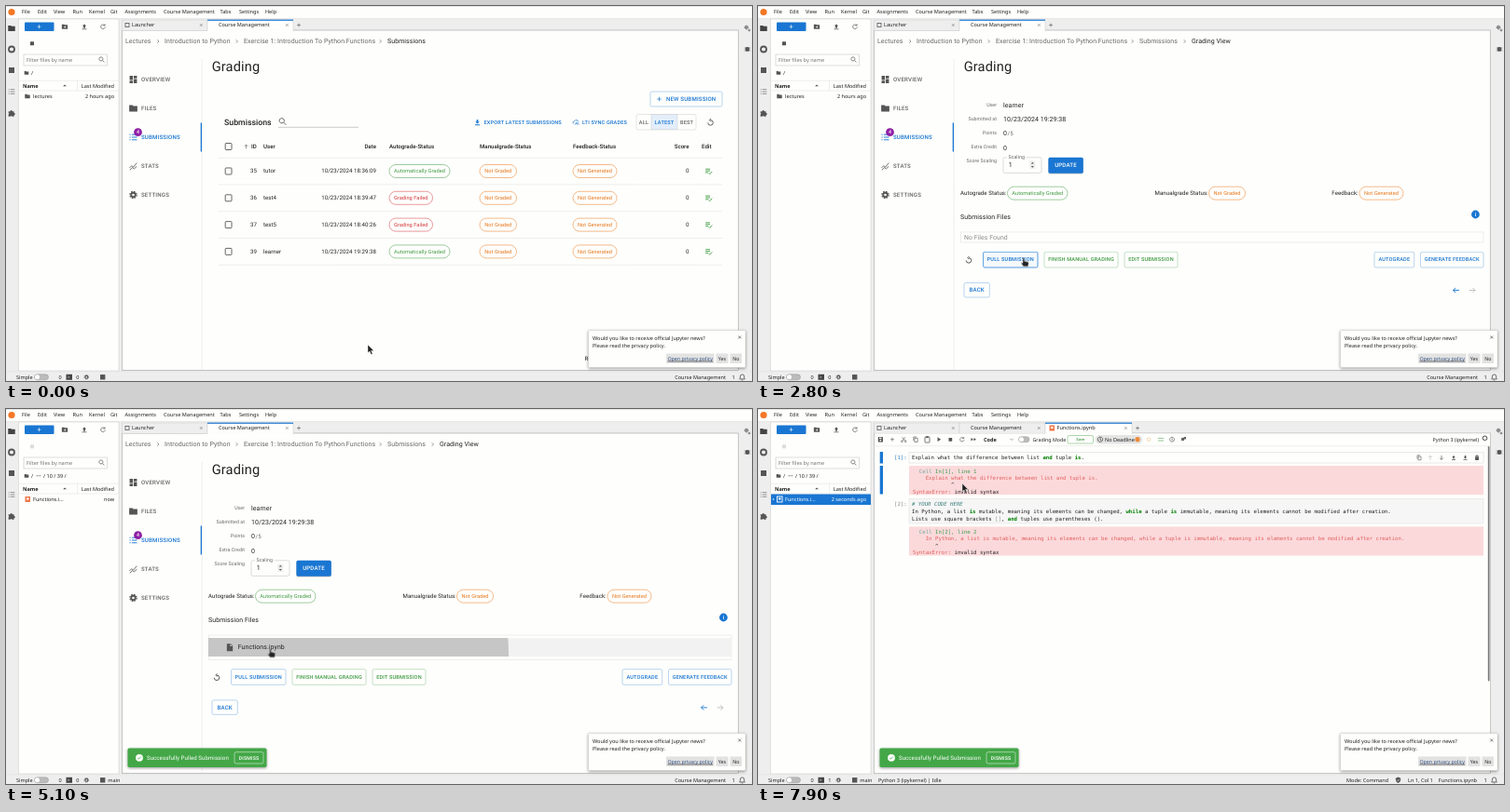
These frames come from a looping animation (800x403 px, 8 s). An HTML page:

```html
<!DOCTYPE html>
<html lang="en">
<head>
<meta charset="utf-8">
<title>Grading walkthrough</title>
<style>
html, body { margin: 0; width: 100%; height: 100%; overflow: hidden; background: #eee; }
svg { display: block; width: 100vw; height: 100vh; }
text { white-space: pre; font-family: "Noto Sans", "Open Sans", sans-serif; text-rendering: geometricPrecision; }
.r { font-family: Roboto, sans-serif; letter-spacing: .0094em; }
.b { font-family: Roboto, sans-serif; font-weight: 500; letter-spacing: .0286em; }
.h { font-family: Roboto, sans-serif; font-weight: 500; }
.m { font-family: "DejaVu Sans Mono", monospace; }
.s { font-weight: 600; }
.e { text-anchor: end; }
.c { text-anchor: middle; }
.k { font-weight: bold; fill: #008000; }
.cursor { animation: move 8s linear infinite; }
@keyframes move {
  0%, 2.5% { transform: translate(388px, 364px); animation-timing-function: ease-out; }
  11.25%, 18.75% { transform: translate(355px, 262px); animation-timing-function: ease-in-out; }
  31%, 40% { transform: translate(284px, 270.5px); animation-timing-function: ease-in-out; }
  48.75% { transform: translate(283px, 257px); }
  51.25%, 67.5% { transform: translate(282.5px, 257.5px); animation-timing-function: ease-in-out; }
  75%, 88.75% { transform: translate(273px, 213px); animation-timing-function: ease-in-out; }
  98.75%, 100% { transform: translate(219px, 80px); }
}
.ripple { animation: grow 8s linear infinite; transform-origin: 283px 262px; }
@keyframes grow {
  0%, 61.3% { transform: scale(0); opacity: .1; animation-timing-function: cubic-bezier(.4, 0, .2, 1); }
  68.2%, 100% { transform: scale(1); opacity: .26; }
}
</style>
</head>
<body>
<svg id="stage" viewBox="0 0 800 403" preserveAspectRatio="none"></svg>
<script>
const BLUE = '#1976d2', GREEN = '#3f9a43', ORANGE = '#e8761a', RED = '#d3383b',
      INK = '#212121', GREY = '#666', LINE = '#dedede', PAGE = '#fefefc', LOOP = 8000;
let css = '', count = 0;

// y is the vertical centre of the capitals; Roboto sits a little higher
const text = (x, y, s, size = 5.55, fill = INK, cls = '') =>
  `<text x="${x}" y="${y + size * (/[rbh]/.test(cls) ? .325 : .36)}" font-size="${size}" fill="${fill}" class="${cls}">${s}</text>`;
const rect = (x, y, x2, y2, fill, stroke = 'none', r = 0, w = .5) =>
  `<rect x="${x}" y="${y}" width="${x2 - x}" height="${y2 - y}" rx="${r}" fill="${fill}" stroke="${stroke}" stroke-width="${w}"/>`;
const disc = (x, y, r, fill, stroke = 'none', w = .8) =>
  `<circle cx="${x}" cy="${y}" r="${r}" fill="${fill}" stroke="${stroke}" stroke-width="${w}"/>`;
const line = (x, y, x2, y2, color = LINE, w = .5) =>
  `<path d="M${x} ${y}L${x2} ${y2}" stroke="${color}" stroke-width="${w}"/>`;
// icons live on a 24 unit grid, centred on x, y
const place = (x, y, size) => `transform="translate(${x - size / 2} ${y - size / 2}) scale(${size / 24})"`;
const solid = (x, y, size, d, color = '#555') => `<path ${place(x, y, size)} d="${d}" fill="${color}"/>`;
const wire = (x, y, size, d, color = '#555', w = 2.4) =>
  `<path ${place(x, y, size)} d="${d}" fill="none" stroke="${color}" stroke-width="${w}"/>`;

// content shown only from one time to another
function during(from, to, body) {
  const id = 'v' + count++, at = (ms, o) => `${ms / LOOP * 100}%{opacity:${o}}`;
  css += `@keyframes ${id}{${at(0, from ? 0 : 1)}${from ? at(from, 1) : ''}${to < LOOP ? at(to, 0) : ''}}` +
    `.${id}{animation:${id} ${LOOP}ms step-end infinite}`;
  return `<g class="${id}">${body}</g>`;
}

const I = {
  folder: 'M2 4h8l2 2h10v14H2z',
  board: 'M3 13h8V3H3zm0 8h8v-6H3zm10 0h8V11h-8zm0-18v6h8V3z',
  file: 'M4 2h10l6 6v14H4zm9 1v6h6z',
  down: 'M9 3h6v7h4l-7 7-7-7h4zM4 19h16v3H4z',
  up: 'M9 17h6v-7h4l-7-7-7 7h4zM4 19h16v3H4z',
  play: 'M7 4l12 8-12 8z',
  puzzle: 'M3 7h5a3 3 0 1 1 6 0h5v5a3 3 0 1 1 0 6v4h-6a3 3 0 0 0-5 0H3v-6a3 3 0 0 0 0-5z',
  bin: 'M5 8h14v14H5zM4 4h16v2H4zM9 2h6v3H9z',
  search: 'M15 15l7 7M10 3a7 7 0 1 0 .01 0',
  plus: 'M12 4v16M4 12h16',
  cross: 'M5 5l14 14M19 5L5 19',
  next: 'M9 5l7 7-7 7',
  list: 'M8 5h14M8 12h14M8 19h14M2 5h3M2 12h3M2 19h3',
  chart: 'M2 17l6-6 4 4 9-11M3 22l7-6 4 3 7-6',
  reset: 'M12 6a7 7 0 1 1-7 7M13 2L9 6l4 4',
  refresh: 'M18 7a8 8 0 1 0 2 6M19 2v6h-6',
  edit: 'M3 6h13M3 11h13M3 16h8M12 18l3 3 7-8',
  left: 'M21 12H4M11 5l-7 7 7 7',
  right: 'M3 12h17M13 5l7 7-7 7',
  upArrow: 'M12 21V4M5 11l7-7 7 7',
  downArrow: 'M12 3v17M5 13l7 7 7-7',
  check: 'M5 12l5 5 9-10',
  copy: 'M8 7h12v15H8zM4 17V2h12',
  clock: 'M12 3a9 9 0 1 0 .01 0M12 7v6l4 2',
  cut: 'M6 3l11 14M18 3L7 17M5 17a3 3 0 1 0 .01 0M19 17a3 3 0 1 0 .01 0',
  sync: 'M3 17a5 5 0 0 1 3-9 7 7 0 0 1 13 2M9 20l3-7 3 7M16 12l5 8'
};

const gear = (x, y, r, color) => disc(x, y, r * .62, 'none', color, r * .5) +
  `<circle cx="${x}" cy="${y}" r="${r}" fill="none" stroke="${color}" stroke-width="${r * .35}" stroke-dasharray="${r * .45} ${r * .335}"/>`;
const chip = (x, y, x2, label, color) =>
  rect(x, y - 7, x2, y + 7, PAGE, color, 7) + text((x + x2) / 2, y, label, 5.65, color, 'r c');
const button = (x, y, x2, y2, label, color, size = 5.6) =>
  rect(x, y, x2, y2, PAGE, color + '99', 1.75) + text((x + x2) / 2, (y + y2) / 2, label, size, color, 'b c');
const toggle = (x, y, w) => rect(x, y - 3, x + w, y + 3, '#bbb', '#999', 3) + disc(x + 3, y, 2.5, '#fff');

function frame() {
  const menu = [['File', 17], ['Edit', 34], ['View', 51], ['Run', 71.5], ['Kernel', 89], ['Git', 112],
    ['Assignments', 127.5], ['Course Management', 169], ['Tabs', 229.5], ['Settings', 250], ['Help', 278]];
  return rect(0, 0, 800, 403, '#eee') + rect(0, 0, 800, 13, PAGE) + line(0, .3, 800, .3, '#ccc', .6) + line(0, 13.4, 800, 13.4) +
    disc(6, 6.5, 3.6, '#f37726') + menu.map(([s, x]) => text(x, 6.5, s)).join('') +
    solid(6, 24, 9, I.folder, '#444') + disc(6, 46.5, 3, 'none', '#555', 1.8) + rect(3, 66, 9, 72, '#555') +
    wire(6, 92, 8, I.list, '#666', 2) + solid(6, 115, 9, I.puzzle) +
    gear(794, 23, 2, '#555') + gear(797, 26, 1.2, '#555') + disc(795, 46.5, 2.4, '#555') +
    line(791.5, 45, 798.5, 45, '#555') + line(791.5, 48, 798.5, 48, '#555') +
    rect(13.5, 14, 121, 392, PAGE, '#ccc') + rect(124.5, 26, 785.3, 391.5, PAGE, '#b5b5b5', 0, .8) +
    line(0, 392.8, 800, 392.8, '#ddd');
}

function browser() {
  const row = (s, when) => text(29, 97, s) + text(116, 97, when, 5.55, INK, 'e');
  const bookIcon = c => rect(20.5, 94, 26, 100, c) + rect(22, 95.5, 24.5, 97.5, '#fff');
  const clone = rect(26, 38.3, 30, 42.3, '#555');
  return rect(20, 17.5, 51.5, 27, BLUE, 'none', 1) + wire(35.5, 22.2, 6, I.plus, '#fff') +
    solid(63, 22.2, 7.5, I.folder) + wire(63.2, 22.6, 3.5, I.plus, '#fff', 4) + solid(84, 22.2, 7.5, I.up) +
    wire(104, 22.2, 7, I.refresh) +
    during(0, 3100, clone) + during(3100, LOOP, `<g opacity=".2">${clone}</g>`) +
    rect(19, 52, 108.5, 64, PAGE, '#bbb') + text(22, 58, 'Filter files by name', 5.55, '#757575') +
    wire(102.5, 57.5, 7, I.search) + solid(22, 71.8, 5.5, I.folder) + text(27, 71.8, '/') +
    line(14, 80.3, 121, 80.3) + line(14, 91, 121, 91) + line(76.5, 80.3, 76.5, 91) +
    text(18, 85.6, 'Name', 5.55, INK, 's') + solid(63, 85.5, 5, 'M3 16l9-9 9 9z') +
    text(116, 85.6, 'Last Modified', 5.55, INK, 'e') +
    during(0, 3100, solid(23, 97, 6.5, I.folder) + row('lectures', '2 hours ago')) +
    during(3100, LOOP, [33, 34.8, 36.6].map(x => disc(x, 71.8, .5, INK)).join('') + text(40, 71.8, '/ 10 / 39 /')) +
    during(3100, 5800, bookIcon('#f0784a') + row('Functions.i...', 'now')) +
    during(3200, 4500, rect(27.3, 92, 62.5, 102, 'none', '#333', 0, .9)) +
    during(5800, LOOP, rect(14, 91.5, 121, 103, BLUE) + disc(16.5, 97, .8, '#fff') +
      rect(20.5, 94, 26, 100, 'none', '#fff', 0, .9) + rect(22, 95.5, 24.5, 97.5, '#fff') +
      text(29, 97, 'Functions.i...', 5.55, '#fff') + text(116, 97, '2 seconds ago', 5.55, '#fff', 'e'));
}

function tabs() {
  const tab = (x, x2, on) => rect(x, 15, x2, 26.2, on ? PAGE : '#eee', '#ccc') +
    (on ? rect(x, 14.6, x2, 15.8, BLUE) + rect(x + .3, 25.4, x2 - .3, 27, PAGE) : '') +
    wire(x2 - 6.7, 20.5, 4.5, I.cross, '#444');
  const first = tab(124.5, 216) + rect(128, 18.5, 132, 22.5, 'none', '#555', 0, .8) + text(135, 20.5, 'Launcher');
  const course = on => tab(216, 308, on) + text(228, 20.5, 'Course Management');
  return first + during(0, 5400, course(true) + wire(314, 20.5, 6, I.plus)) +
    during(5400, LOOP, course(false) + tab(308, 401, true) + rect(312.5, 17.5, 318, 23.5, '#f0784a') +
      rect(314, 19, 316.5, 21, '#fff') + text(320.5, 20.5, 'Functions.ipynb') + wire(407, 20.5, 6, I.plus));
}

function courseNav() {
  const trail = [['Lectures', 128], ['Introduction to Python', 170], ['Exercise 1: Introduction To Python Functions', 255]];
  const arrow = x => wire(x, 38, 6, I.next, GREY, 2.6);
  const items = ['OVERVIEW', 'FILES', 'SUBMISSIONS', 'STATS', 'SETTINGS'];
  return trail.map(([s, x]) => text(x, 38, s, 7, GREY, 'r')).join('') + [163, 247.5, 401.5].map(arrow).join('') +
    during(0, 1300, text(409, 38, 'Submissions', 7, INK, 'r')) +
    during(1300, LOOP, text(409, 38, 'Submissions', 7, GREY, 'r') + arrow(457.5) + text(465, 38, 'Grading View', 7, INK, 'r')) +
    items.map((s, i) => text(145, 79 + i * 31, s, 6.125, i === 2 ? BLUE : GREY, 'b')).join('') +
    solid(136.5, 79, 10.5, I.board) + solid(136.5, 110, 10.5, I.folder) + wire(136.5, 141, 9.5, I.list, BLUE) +
    wire(136.5, 172, 10, I.chart, '#555', 2) + gear(136.5, 203, 3.6, '#555') +
    disc(141.5, 135.7, 4.4, '#8e1fa5') + text(141.5, 135.7, '4', 5.25, '#fff', 'h c') +
    line(210.2, 57, 210.2, 391, '#ddd') + rect(208.7, 125.5, 210, 156.5, BLUE) +
    text(220.7, 65.3, 'Grading', 14.6, INK, 'r');
}

function submissions() {
  const box = y => rect(235.2, y - 3.5, 242, y + 3.5, PAGE, '#555', .8, .9);
  const head = [['ID', 263], ['User', 276], ['Autograde-Status', 411], ['Manualgrade-Status', 508], ['Feedback-Status', 608], ['Edit', 746]];
  const rows = [[35, 'tutor', '18:36:09', 1], [36, 'test4', '18:39:47', 0], [37, 'test5', '18:40:26', 0], [39, 'learner', '19:29:38', 1]];
  const row = ([id, who, time, ok], i) => {
    const y = 177.5 + i * 28.8;
    return box(y) + text(269, y, id, 6.125, INK, 'r e') + text(276, y, who, 6.125, INK, 'r') +
      text(397, y, '10/23/2024 ' + time, 6.125, INK, 'r e') +
      (ok ? chip(411, y, 476, 'Automatically Graded', GREEN) : chip(411, y, 457.5, 'Grading Failed', RED)) +
      chip(508, y, 547.5, 'Not Graded', ORANGE) + chip(608, y, 655, 'Not Generated', ORANGE) +
      text(732.5, y, '0', 6.125, INK, 'r e') + wire(753.5, y, 9, I.edit, '#43a047') + line(228, y + 14.4, 768, y + 14.4);
  };
  return rect(691, 92, 768, 108, PAGE, BLUE + '99', 1.75) + wire(700.5, 100, 7, I.plus, BLUE) +
    text(708, 100, 'NEW SUBMISSION', 6.1, BLUE, 'b') +
    text(234, 125, 'Submissions', 8.75, INK, 'h') + wire(296.5, 124, 9, I.search) + line(292, 130.3, 378, 130.3, '#999') +
    solid(505.5, 125, 7.5, I.down, BLUE) + text(512.5, 125, 'EXPORT LATEST SUBMISSIONS', 5.57, BLUE, 'b') +
    wire(611.5, 125, 7.5, I.sync, BLUE) + text(618, 125, 'LTI SYNC GRADES', 5.57, BLUE, 'b') +
    rect(676, 116.5, 740, 133, PAGE, '#ccc', 1.75) + rect(692, 116.7, 720, 132.8, '#e3eefa', '#ccc') +
    text(684, 125, 'ALL', 5.6, GREY, 'b c') + text(706, 125, 'LATEST', 5.6, BLUE, 'b c') + text(730, 125, 'BEST', 5.6, GREY, 'b c') +
    wire(755.5, 125, 9.5, I.reset) +
    during(650, 1300, rect(228, 249.7, 768, 278.3, '#f4f4f4')) +
    box(151) + wire(257.5, 151, 6, I.upArrow) + head.map(([s, x]) => text(x, 151, s, 6.125, INK, 'h')).join('') +
    text(397, 151, 'Date', 6.125, INK, 'h e') + text(732.5, 151, 'Score', 6.125, INK, 'h e') +
    line(228, 163.2, 768, 163.2) + rows.map(row).join('') + text(620.5, 379, 'Rows per page:', 6.125, INK, 'r');
}

function actions(dy) {
  const y = 264.3 + dy, y2 = 281 + dy, arrowY = 305.5 + dy;
  return wire(226, 273 + dy, 9.5, I.reset) + button(241.5, y, 300, y2, 'PULL SUBMISSION', BLUE) +
    button(307, y, 386, y2, 'FINISH MANUAL GRADING', GREEN) + button(393, y, 450, y2, 'EDIT SUBMISSION', GREEN) +
    button(661, y, 703.7, y2, 'AUTOGRADE', BLUE) + button(710.5, y, 778, y2, 'GENERATE FEEDBACK', BLUE) +
    button(221, 297.5 + dy, 248.3, 313 + dy, 'BACK', BLUE, 6.125) +
    wire(748.5, arrowY, 9, I.left, BLUE) + wire(766, arrowY, 9, I.right, '#bbb');
}

function gradingView() {
  const labels = ['User', 'Submitted at', 'Points', 'Extra Credit', 'Score Scaling'];
  const value = (y, s) => text(263, y, s, 7, INK, 'r');
  return labels.map((s, i) => text(256, 106 + i * 15.1, s, 5.25, GREY, 'r e')).join('') +
    value(107, 'learner') + value(122, '10/23/2024 19:29:38') +
    during(1300, 1600, text(264, 137, '/', 6.1, GREY, 'r')) +
    during(1600, LOOP, value(137, '0') + text(267.6, 137.3, '/5', 6.1, GREY, 'r') + value(152.3, '0')) +
    rect(263, 162.8, 304, 179.5, PAGE, '#bbb', 1.75) + rect(267, 161, 288, 165, PAGE) +
    text(268.5, 162.3, 'Scaling', 5.25, GREY, 'r') + text(268.7, 170.8, '1', 7, INK, 'r') +
    rect(291.3, 166.5, 297.3, 175, '#eee') + solid(294.3, 168.7, 4, 'M3 17l9-10 9 10z') + solid(294.3, 172.8, 4, 'M3 7l9 10 9-10z') +
    rect(311.4, 163.5, 348.8, 180.4, '#bbb', 'none', 1.75) + rect(311.4, 162.8, 348.8, 179.8, BLUE, 'none', 1.75) +
    text(330, 171, 'UPDATE', 6.125, '#fff', 'b c') +
    text(217, 201, 'Autograde Status:', 6.125, INK, 'r') + chip(267.5, 201.2, 332, 'Automatically Graded', GREEN) +
    text(425.5, 201, 'Manualgrade Status:', 6.125, INK, 'r') + chip(483.5, 201.2, 522.5, 'Not Graded', ORANGE) +
    text(615.3, 201, 'Feedback:', 6.125, INK, 'r') + chip(645, 201.2, 692, 'Not Generated', ORANGE) +
    text(217, 227, 'Submission Files', 7, INK, 'r') + disc(769.4, 224, 4.4, BLUE) + text(769.4, 224, 'i', 6, '#fff', 'h c') +
    during(1300, 3300, rect(217.5, 243, 778, 254, PAGE, LINE) + text(221, 248.3, 'No Files Found', 6.9, '#8a8a8a', 'r') + actions(0)) +
    during(2300, 3300, rect(241.5, 264.3, 300, 281, BLUE + '0a', BLUE, 1.75)) +
    during(3300, LOOP, rect(217.5, 243, 778, 269.5, PAGE, LINE) + actions(15.4) +
      during(3500, LOOP, rect(217.7, 246.3, 777.8, 266, '#f2f2f2')) +
      `<g clip-path="url(#row)"><circle class="ripple" cx="283" cy="262" r="495"/></g>` +
      solid(240, 256.2, 9.5, I.file) + text(248.7, 256.2, 'Functions.ipynb', 7, INK, 'r'));
}

function notebook() {
  const code = (x, y, s, fill = INK) => text(x, y, s, 5.69, fill, 'm');
  const kw = s => `<tspan class="k">${s}</tspan>`;
  const sentence = 'a list is mutable, meaning its elements can be changed, while a tuple is immutable, meaning its elements cannot be modified after creation.';
  const error = (y, n, src, indent) => rect(162, y - 5.6, 778, y + 25.6, '#fbd9db') +
    code(166, y, `  <tspan fill="#70a8a0">Cell</tspan> In[${n}], line ${n}`, '#3d9c50') +
    code(166, y + 7.3, '    ' + src, '#e2605f') + code(166, y + 14.6, ' '.repeat(indent) + '^') +
    code(166, y + 21.9, '<tspan fill="#e2605f">SyntaxError:</tspan> invalid syntax');
  const tools = wire(144, 32.7, 6, I.plus) + wire(156.3, 32.7, 6.5, I.cut) + wire(169, 32.7, 6.5, I.copy) +
    rect(179, 30, 184, 36, 'none', '#555', .5, .8) + rect(180.3, 29.2, 182.7, 31, '#555') +
    solid(194, 32.7, 7, I.play) + rect(204.5, 31, 208.2, 34.7, '#555') + wire(218.8, 32.7, 6.5, I.refresh) +
    solid(229.5, 32.7, 5, I.play) + solid(232.5, 32.7, 5, I.play) +
    rect(128.8, 30, 134, 35.4, '#555', 'none', .5) + rect(130, 30.7, 132.5, 32, '#fff') + disc(131.4, 33.6, .9, '#fff') +
    text(242, 32.7, 'Code', 5.55, INK, 's') + wire(272, 32.7, 5, 'M4 8l8 8 8-8') + toggle(279.5, 32.7, 11.5) +
    text(294.5, 32.7, 'Grading Mode', 5.3, INK) +
    rect(332, 28.5, 359.5, 37, PAGE, '#58ad5b', 1.5) + text(345.8, 32.7, 'Save', 4, GREEN, 'b c') +
    rect(362, 28, 412, 37.5, '#e4e4e4', 'none', 4.5) + wire(367, 32.7, 7, I.clock, '#333') +
    text(372, 32.7, 'No Deadline', 5.5, INK) + disc(407, 32.7, 2.6, '#ef8b3a') +
    disc(419, 32.7, 1.8, 'none', '#f0cf9a') + line(429, 31.5, 435, 31.5, '#7cb87e', .8) + line(429, 34, 435, 34, '#7cb87e', .8) +
    wire(444, 32.7, 6.5, I.clock) + rect(454, 31, 457, 34, '#666') + rect(456.5, 30, 459, 32.5, '#666') +
    text(773, 32.7, 'Python 3 (ipykernel)', 5.3, INK, 'e');
  const cells = rect(130.7, 46, 134, 58.5, BLUE) + rect(130.7, 61, 134, 91.5, BLUE) +
    code(146, 52.3, '[1]:', '#307fc1') + rect(162, 46.5, 778, 58, PAGE, '#d5d5d5') +
    code(165, 52.3, `Explain what the difference between list ${kw('and')} tuple ${kw('is')}.`) +
    wire(709, 52.3, 6, I.copy) + wire(721, 52.3, 6.5, I.upArrow, '#bbb') + wire(733, 52.3, 6.5, I.downArrow) +
    solid(746, 52.3, 6, I.up) + solid(758.5, 52.3, 6, I.down) + solid(771, 52.3, 6.5, I.bin) +
    error(66.6, 1, 'Explain what the difference between list and tuple is.', 12) +
    code(146, 102.4, '[2]:', '#8a8a8a') + rect(162, 96.5, 778, 123, '#f6f6f6', '#ddd') +
    `<g font-style="italic">${code(165, 102.4, '# YOUR CODE HERE', '#408080')}</g>` +
    code(165, 110.2, 'In Python, ' + sentence.replace(/\b(is|while)\b/g, kw('$1'))) +
    code(165, 118, `Lists use square brackets <tspan fill="#8a9a8a">[]</tspan>, ${kw('and')} tuples use parentheses ().`) +
    error(132, 2, 'In Python, ' + sentence, 7);
  return rect(124.9, 26.5, 784.9, 391.1, PAGE) + tools + line(124.5, 39.7, 785, 39.7, '#ddd') +
    during(5400, 6500, disc(779.5, 31.3, 2.5, '#444')) + during(6500, LOOP, disc(779.5, 31.3, 2.3, PAGE, '#444', 1)) +
    during(5600, LOOP, cells + rect(782.8, 40, 784.5, 292.5, '#777', 'none', .8));
}

function status() {
  const y = 398.8;
  return text(11, y, 'Simple') + toggle(30.5, y, 15) + text(56.5, y, '0') + rect(64.5, y - 3, 71, y + 3, '#444') +
    wire(67, y, 4, I.next, '#fff', 4) + during(0, 5900, text(75.3, y, '0')) + during(5900, LOOP, text(75.3, y, '1')) +
    gear(86.3, y, 2.3, '#555') + rect(101, y - 2.7, 106.4, y + 2.7, '#555') +
    during(3200, LOOP, text(109.3, y, 'main')) +
    during(0, 5400, text(772, y, 'Course Management', 5.55, INK, 'e')) +
    during(5400, LOOP, text(631, y, 'Mode: Command') + solid(686.5, y, 7, 'M12 1l9 4v7q-1 8-9 11-8-3-9-11V5z') +
      wire(686.5, y, 4, I.check, '#fff', 4) + text(697, y, 'Ln 1, Col 1') + text(771, y, 'Functions.ipynb', 5.55, INK, 'e')) +
    during(5400, 6500, text(129, y, 'Python 3 (ipykernel) | Unknown')) +
    during(6500, LOOP, text(129, y, 'Python 3 (ipykernel) | Idle')) +
    text(778.5, y, '1') + wire(789.5, y, 8.5, 'M4 18h16l-2-3V10a6 6 0 0 0-12 0v5zM10 21h4');
}

function popups() {
  const box = (x, x2, s, fill = INK) => rect(x, 373.5, x2, 384, '#e2e2e2') + text((x + x2) / 2, 378.8, s, 5.3, fill, 'c');
  const shadow = 'style="filter:drop-shadow(0 1px 1.5px #0006)"';
  return `<g ${shadow}>${rect(624.5, 348.5, 793, 388.5, PAGE, '#ccc', 1)}</g>` +
    text(629, 357, 'Would you like to receive official Jupyter news?') + text(629, 365.5, 'Please read the privacy policy.') +
    wire(786.7, 356, 5, I.cross, '#333', 3) +
    `<g text-decoration="underline">${box(708, 759.5, 'Open privacy policy', '#2a4b80')}</g>` +
    box(761.5, 774.5, 'Yes') + box(776.5, 789, 'No') +
    during(3300, LOOP, `<g ${shadow}>${rect(130.5, 364.5, 279.5, 385, '#43a747', 'none', 1.75)}</g>` +
      disc(143, 374.8, 3.9, '#fff') + wire(143, 374.8, 6.5, I.check, '#43a747', 3) +
      text(151, 374.8, 'Successfully Pulled Submission', 6.125, '#fff', 'r') +
      rect(245, 368.7, 276, 381, 'none', '#fff', 1.75) + text(260.5, 374.9, 'DISMISS', 5.25, '#fff', 'b c'));
}

function cursor() {
  const pointer = `<path d="M0 0v8.8l2-1.8 1.5 3.4 1.6-.7L3.6 6.4h2.8z" fill="#222" stroke="#fff" stroke-width=".4"/>`;
  const hand = `<path d="M0 .6q.9-1.1 1.7 0v3l3.8.8q1 .4.8 1.6l-.7 3.4H.8L-1.9 6q.1-1.3 1.9-.3z" fill="#222" stroke="#fff" stroke-width=".4"/>`;
  return `<g class="cursor">${during(0, 2300, pointer)}${during(2300, 5400, hand)}${during(5400, LOOP, pointer)}</g>`;
}

const scene = '<defs><clipPath id="row"><rect x="217.7" y="246.3" width="560" height="19.7"/></clipPath></defs>' +
  frame() + browser() + tabs() +
  during(0, 5400, courseNav() + during(0, 1300, submissions()) + during(1300, LOOP, gradingView())) +
  during(5400, LOOP, notebook()) + status() + popups() + cursor();
document.getElementById('stage').innerHTML = `<style>${css}</style>` + scene;
</script>
</body>
</html>
```
